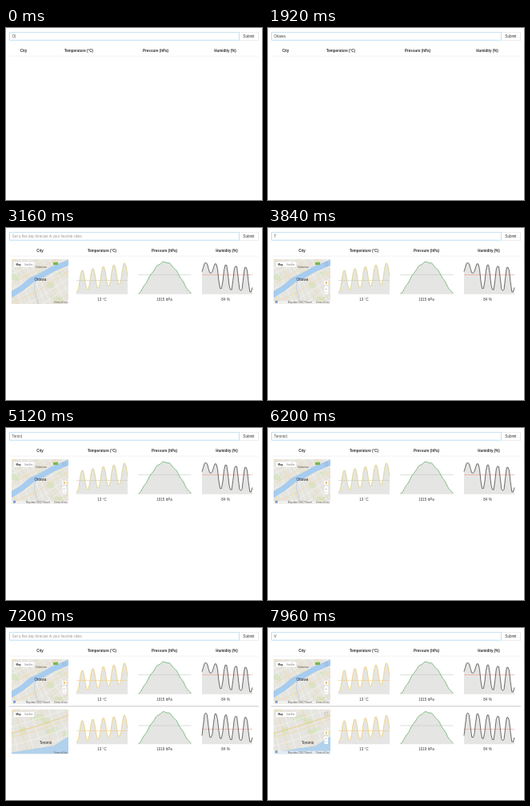
These frames come from a looping animation (320x215 px, 8000 ms). An HTML page with a canvas:

```html
<!DOCTYPE html>
<html lang="en">
<head>
<meta charset="utf-8">
<title>Five day forecast</title>
<style>
html, body { margin: 0; width: 100%; height: 100%; overflow: hidden; background: #fff; }
canvas { display: block; width: 100vw; height: 100vh; }
</style>
</head>
<body>
<canvas id="stage"></canvas>
<script>
const W = 320, H = 215, LOOP = 8000;
const MAP_W = 71, MAP_H = 56, CHART_H = 43.7;
const FONT = '"Liberation Sans", Arial, sans-serif';
const HINT = 'Get a five day forecast in your favorite cities';
const canvas = document.getElementById('stage');
const ctx = canvas.getContext('2d');

// Each word is typed letter by letter, then submitted
const words = [
  { word: 'Ottawa', start: 0, step: 260, submit: 2240 },
  { word: 'Toronto', start: 3720, step: 310, submit: 6400 },
  { word: 'V', start: 7800, step: 300, submit: LOOP }
];

const cities = [
  { top: 39, added: 2240, mapped: 2560, controls: 3280, paint: paintOttawa,
    hPa: 1015, rise: 11, firstDip: 0.4, means: [26.5, 19.5, 19.5] },
  { top: 101.5, added: 6400, mapped: 6800, controls: 7240, paint: paintToronto,
    hPa: 1019, rise: 8, firstDip: 1, means: [27, 20.5, 25] }
];

function rect(x, y, w, h, color) {
  ctx.fillStyle = color;
  ctx.fillRect(x, y, w, h);
}

function path(points) {
  ctx.beginPath();
  points.forEach(([x, y]) => ctx.lineTo(x, y));
}

function line(points, color, width) {
  path(points);
  ctx.strokeStyle = color;
  ctx.lineWidth = width;
  ctx.stroke();
}

function text(str, x, y, size = 4.5, color = '#333', align = 'left', weight = '') {
  ctx.font = `${weight} ${size}px ${FONT}`;
  ctx.fillStyle = color;
  ctx.textAlign = align;
  ctx.fillText(str, x, y);
}

function seeded(seed) {
  return () => (seed = seed * 16807 % 2147483647) / 2147483647;
}

// Samples f(u), u from 0 to 1, as points between two x positions
function sample(left, right, f, n = 39) {
  return Array.from({ length: n + 1 }, (_, i) => [left + (right - left) * i / n, f(i / n)]);
}

// Flat-topped daily cycle from -1 to 1, peaking first at u = peak
function daily(u, peak, period) {
  const wave = 1.25 * Math.cos((u - peak) / period * 2 * Math.PI);
  return Math.max(-1, Math.min(1, wave));
}

function searchBar(t) {
  const entry = words.filter(w => w.start <= t).pop();
  const typed = Math.floor((t - entry.start) / entry.step) + 1;
  const value = t < entry.submit ? entry.word.slice(0, typed) : '';
  line([[292, 5.5], [315.5, 5.5], [315.5, 15.5], [292, 15.5]], '#e2e2e2', 0.6);
  line([[315.5, 5.5], [315.5, 15.5]], '#e2e2e2', 0.6);
  ctx.strokeStyle = '#a9d4ef';
  ctx.lineWidth = 0.7;
  ctx.strokeRect(4.5, 5.4, 287, 9.9);
  text('Submit', 303.5, 12, 4.6, '#333', 'center');
  if (value) text(value, 7.5, 12, 4.5, '#444');
  else text(HINT, 7.5, 12, 4.5, '#999');
  if (value && t % 1000 < 500) rect(8 + ctx.measureText(value).width, 8, 0.4, 4.8, '#444');
}

function header(filled) {
  const centers = filled ? [42.5, 120, 198, 276] : [22, 91, 187, 274];
  ['City', 'Temperature (°C)', 'Pressure (hPa)', 'Humidity (%)'].forEach((name, i) =>
    text(name, centers[i], 29.8, 4.5, '#333', 'center', 'bold'));
  rect(4, 34.8, 312, 0.5, '#e6e6e6');
}

function chart(points, color, mean, meanColor) {
  const left = points[0][0], right = points[points.length - 1][0];
  path([[left, CHART_H], ...points, [right, CHART_H]]);
  ctx.fillStyle = '#e5e5e3';
  ctx.fill();
  line([[left, mean], [right, mean]], meanColor, 0.6);
  line(points, color, 0.9);
}

function charts(city, bright) {
  const temp = sample(88, 152, u => 28 - city.rise * u - 12.5 * daily(u, 0.115, 0.206));
  const pressure = sample(165.5, 231.5, u =>
    43 - 39.5 * Math.sin(Math.PI * u) ** 1.3 + 0.7 * Math.sin(u * 50));
  const humidity = sample(245, 308, u => {
    const depth = u < 0.27 ? city.firstDip : 1;
    return 4 + 7 * u + 15 * depth * (1 + daily(u, 0.175, 0.198));
  });
  chart(temp, bright ? '#edd284' : '#ddd391', city.means[0], bright ? '#f0cd7c' : '#cbc9b8');
  chart(pressure, '#72b879', city.means[1], '#c4cbc3');
  chart(humidity, '#5a5a5a', city.means[2], '#ed9c96');
  [['13 °C', 120], [city.hPa + ' hPa', 198], ['84 %', 274.5]].forEach(([label, x]) =>
    text(label, x, 51.8, 4.5, '#333', 'center'));
}

// Slanted street grid with jittered lines; every third is a main road
function streets(seed, slope, gap) {
  const rnd = seeded(seed);
  for (let i = -4; i < 14; i++) {
    const main = i % 3 === 0;
    const color = main ? '#f2d694' : '#f8f7f3';
    const a = i * gap + rnd() * 4, bend = rnd() * 5;
    line([[0, a], [30, a - 30 * slope + bend], [MAP_W, a - MAP_W * slope]], color, 0.6);
    line([[a, 0], [a + 25 * slope + bend, 25], [a + MAP_H * slope, MAP_H]], color, 0.6);
  }
}

function parks(seed) {
  const rnd = seeded(seed);
  for (let i = 0; i < 9; i++) {
    rect(rnd() * 64, rnd() * 48, 3 + rnd() * 7, 2 + rnd() * 6, '#d9e3c8');
  }
}

function paintOttawa() {
  parks(41);
  streets(17, 0.55, 9);
  line([[-3, 46], [13, 36], [25, 26], [36, 21], [52, 12], [74, 3]], '#a6ccef', 7);
  line([[31, 24], [28, 35], [34, 58]], '#b4d0ea', 0.9);
  rect(52, 3.8, 6, 3.4, '#78b84b');
  text('Gatineau', 37, 10.8, 3.5, '#555', 'center');
  text('Ottawa', 36, 27, 4.7, '#222', 'center');
}

function paintToronto() {
  parks(73);
  streets(29, 0.32, 11);
  line([[0, 30], [32, 21], [MAP_W, 8]], '#efca7a', 0.9);
  path([[0, 54], [30, 49], [52, 46], [MAP_W, 34], [MAP_W, MAP_H], [0, MAP_H]]);
  ctx.fillStyle = '#b1d1ec';
  ctx.fill();
  text('Toronto', 42.5, 43, 4.7, '#222', 'center');
}

function mapControls() {
  ctx.strokeStyle = '#888';
  ctx.lineWidth = 0.5;
  ctx.setLineDash([1.2, 1.2]);
  ctx.strokeRect(64, 4, 3.6, 3.6);
  ctx.setLineDash([]);
  rect(63.5, 27, 4.5, 5, '#fff');
  rect(65, 28, 1.6, 3, '#e8b251');
  rect(63.5, 34, 4.5, 9.5, '#fff');
  text('+', 65.7, 37.8, 4, '#666', 'center');
  text('−', 65.7, 42.6, 4, '#666', 'center');
  rect(0, 52.2, MAP_W, 3.8, 'rgba(245,245,245,.75)');
  rect(2, 51.8, 3, 3, '#7c9fd4');
  text('Map data ©2017 Norvel', 18, 55, 2.8, '#555');
}

function cityMap(city, t) {
  ctx.save();
  ctx.translate(7, 0);
  ctx.beginPath();
  ctx.rect(0, 0, MAP_W, MAP_H);
  ctx.clip();
  rect(0, 0, MAP_W, MAP_H, '#e6e4de');
  if (t >= city.mapped) {
    city.paint();
    rect(3, 3.5, 25, 6, '#fff');
    text('Map', 5.5, 7.7, 3, '#222', 'left', 'bold');
    text('Satellite', 16, 7.7, 2.9, '#777');
    if (t >= city.controls) mapControls();
    text('Terms of Use', 69.5, 55, 2.8, '#555', 'right');
  }
  ctx.restore();
}

function cityRow(city, t) {
  ctx.save();
  ctx.translate(0, city.top);
  cityMap(city, t);
  charts(city, t >= cities[1].added);
  ctx.restore();
}

function draw(t) {
  const w = Math.round(innerWidth * devicePixelRatio);
  const h = Math.round(innerHeight * devicePixelRatio);
  if (canvas.width !== w || canvas.height !== h) {
    canvas.width = w;
    canvas.height = h;
  }
  ctx.setTransform(w / W, 0, 0, h / H, 0, 0);
  ctx.lineJoin = 'round';
  rect(0, 0, W, H, '#fff');
  searchBar(t);
  header(t >= cities[0].added);
  cities.filter(city => t >= city.added).forEach(city => cityRow(city, t));
  if (t >= cities[1].added) rect(4, 97.4, 312, 0.9, '#c4c4c4');
}

const start = performance.now();
function tick() {
  draw((performance.now() - start) % LOOP);
  requestAnimationFrame(tick);
}
tick();
</script>
</body>
</html>
```
